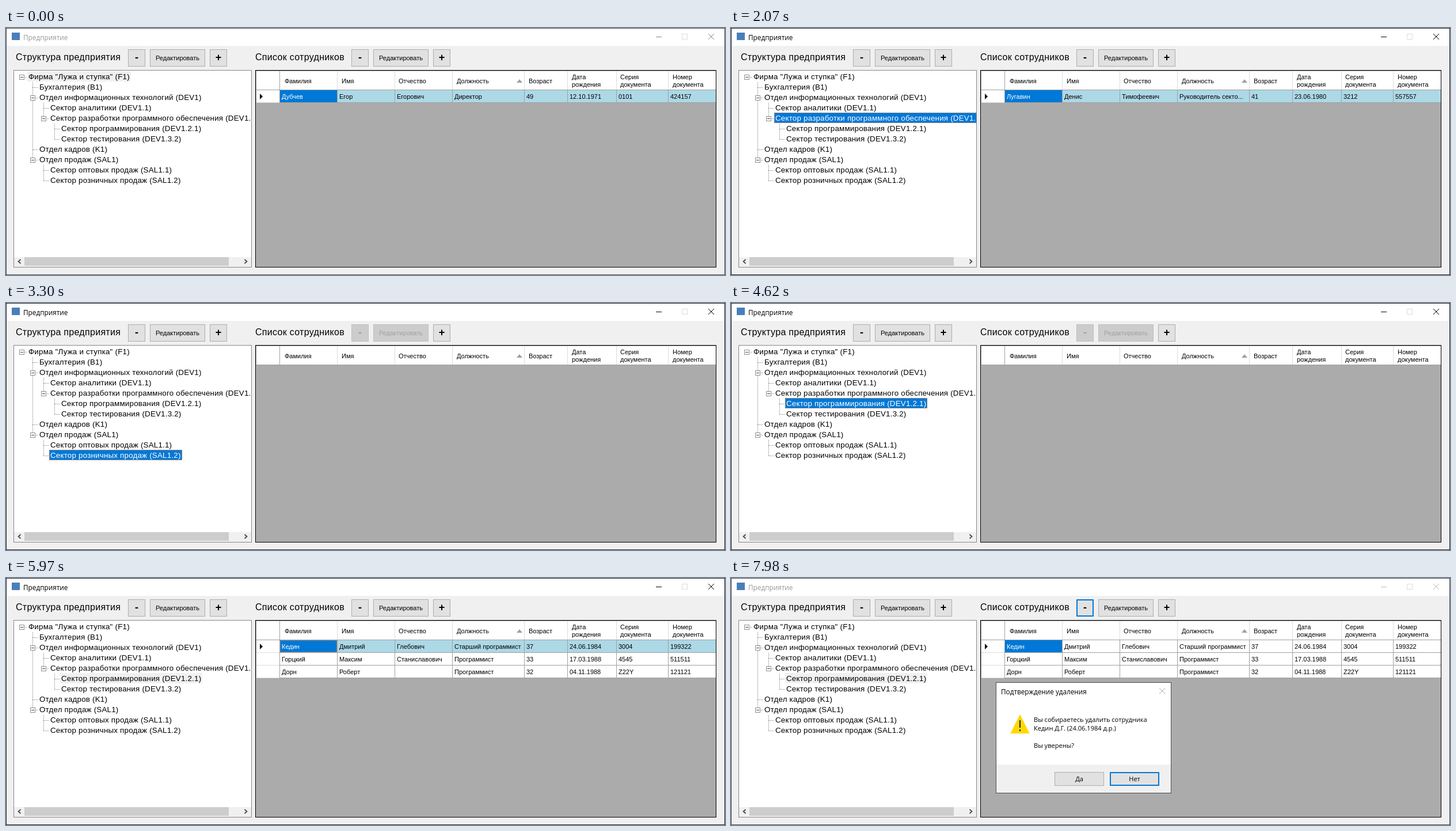
Recreate the animation shown at these times as an HTML page. Size 1249x429 px, loop 8000 ms.

```html
<!DOCTYPE html>
<html lang="ru">
<head>
<meta charset="utf-8">
<title>Предприятие</title>
<style>
html, body { margin: 0; width: 100%; height: 100%; overflow: hidden; background: #f0f0f0; }
svg { display: block; }
rect, line { shape-rendering: crispEdges; }
text { font: 11px "Liberation Sans", Arial, sans-serif; white-space: pre; }
.label { font-size: 16px; letter-spacing: .3px; }
.tree { font-size: 13.33px; letter-spacing: .22px; }
.sign { font-size: 18px; font-weight: bold; text-anchor: middle; }
.mid { text-anchor: middle; }
.title { font: 11.8px "Open Sans", "Noto Sans", sans-serif; }
.msg { font: 11.1px "Open Sans", "Noto Sans", sans-serif; }
</style>
</head>
<body>
<svg id="stage" width="1249" height="429"></svg>
<script>
const LOOP = 8000, BLUE = "#0078d7", GRAY = "#a0a0a0", PALE = "#dcdcdc";
const stage = document.getElementById("stage");

// depth, text, has children
const nodes = [
  [0, 'Фирма "Лужа и ступка" (F1)', 1],
  [1, "Бухгалтерия (B1)"],
  [1, "Отдел информационных технологий (DEV1)", 1],
  [2, "Сектор аналитики (DEV1.1)"],
  [2, "Сектор разработки программного обеспечения (DEV1.2)", 1],
  [3, "Сектор программирования (DEV1.2.1)"],
  [3, "Сектор тестирования (DEV1.3.2)"],
  [1, "Отдел кадров (K1)"],
  [1, "Отдел продаж (SAL1)", 1],
  [2, "Сектор оптовых продаж (SAL1.1)"],
  [2, "Сектор розничных продаж (SAL1.2)"]
];

// employees of each node
const staff = [
  ["Дубчев|Егор|Егорович|Директор|49|12.10.1971|0101|424157"],
  ["Ветлина|Нина|Макаровна|Главный бухгалтер|45|14.02.1976|2210|318204"],
  ["Саженов|Кирилл|Юрьевич|Начальник отдела|44|05.09.1977|1507|640312"],
  ["Полынин|Артём|Денисович|Старший аналитик|38|19.04.1983|4102|275130",
   "Маковцев|Роман|Ильич|Аналитик|31|08.11.1990|3315|509418",
   "Стежкина|Алла|Юрьевна|Аналитик|29|27.01.1992|4008|731226"],
  ["Лугавин|Денис|Тимофеевич|Руководитель секто...|41|23.06.1980|3212|557557"],
  ["Кедин|Дмитрий|Глебович|Старший программист|37|24.06.1984|3004|199322",
   "Горцкий|Максим|Станиславович|Программист|33|17.03.1988|4545|511511",
   "Дорн|Роберт||Программист|32|04.11.1988|Z22Y|121121"],
  ["Ручьин|Антон|Макарович|Тестировщик|30|11.05.1991|3811|402517",
   "Липцева|Дарья|Ильинична|Тестировщик|27|02.12.1993|4217|610933"],
  ["Рябцева|Ольга|Юрьевна|Начальник отдела|46|30.08.1975|1904|223871"],
  ["Камушев|Игорь|Денисович|Начальник отдела|43|16.07.1978|2706|348150"],
  ["Травкин|Семён|Макарович|Менеджер|35|21.10.1985|3109|487062"],
  []
];

const cols = [475, 575, 675, 775, 900, 975, 1060, 1150, 1233];
const heads = [[484, "Фамилия"], [583, "Имя"], [682, "Отчество"], [783, "Должность"], [908, "Возраст"],
  [983, "Дата", "рождения"], [1067, "Серия", "документа"], [1158, "Номер", "документа"]];

// timelines: [start ms, value]
const pick = [[0, 0], [1470, 1], [1670, 2], [1870, 3], [2070, 4], [2270, 5], [2400, 6], [2600, 7],
  [2800, 8], [2930, 9], [3300, 10], [4620, 5]];
const list = [...pick.slice(0, -1), [4750, 5]];
const current = [[0, 0], [5550, 1], [5970, 0], [6570, 1], [7100, 0]];
const focus = [[0, "none"], [1010, "tree"], [5480, "grid"], [7660, "button"]];
const hover = [[0, ""], [270, "add"], [340, ""], [410, "edit"], [480, ""], [4950, "header"], [5020, ""],
  [7500, "remove"], [7580, "press"], [7660, ""]];
const fade = [[0, 0], [7740, .35], [7820, .7], [7900, .9], [7980, 1]];
const at = (steps, t) => steps.findLast(s => s[0] <= t)[1];

const rect = (x, y, w, h, fill, extra = "") =>
  `<rect x="${x}" y="${y}" width="${w}" height="${h}" fill="${fill}" ${extra}/>`;
const frame = (x, y, w, h, fill, edge, width = 1, extra = "") =>
  rect(x + width / 2, y + width / 2, w - width, h - width, fill, `stroke="${edge}" stroke-width="${width}" ${extra}`);
const dots = (x, y, w, h) => frame(x, y, w, h, "none", "#ff8728", 1, 'stroke-dasharray="1 1"');
const path = (d, stroke, fill = "none", width = 1) =>
  `<path d="${d}" stroke="${stroke}" fill="${fill}" stroke-width="${width}"/>`;
const dotted = (x1, y1, x2, y2) =>
  `<line x1="${x1}" y1="${y1}" x2="${x2}" y2="${y2}" stroke="#808080" stroke-dasharray="1 1"/>`;
const text = (x, y, s, cls = "", fill = "#000") => `<text x="${x}" y="${y}" class="${cls}" fill="${fill}">${s}</text>`;
const cross = (x, y, color) => path(`M${x} ${y}l10 10m0 -10l-10 10`, color);

const pen = document.createElement("canvas").getContext("2d");
pen.font = '13.33px "Liberation Sans", Arial, sans-serif';
const treeWidth = s => pen.measureText(s).width + s.length * .22;

const looks = {
  normal: ["#e1e1e1", "#adadad"], hover: ["#e5f1fb", BLUE], press: ["#cce4f7", "#005499"],
  off: ["#ccc", "#bfbfbf"], focus: ["#e1e1e1", BLUE, 2]
};
function button(x, caption, look = "normal") {
  const sign = caption.length < 2, w = sign ? 30 : 96;
  return frame(x, 37, w, 30, ...looks[look]) +
    text(x + w / 2, sign ? 57 : 56, caption, sign ? "sign" : "mid", look == "off" ? GRAY : "#000");
}

function drawWindow(s) {
  const active = s.focus == "tree" || s.focus == "grid", modal = s.focus == "button";
  const ink = active ? "#000" : modal && s.fade ? "#bbb" : "#888";
  const off = !staff[s.list].length && "off";
  const look = name => s.hover == name ? "hover" : "normal";
  const remove = off || (modal ? "focus" : s.hover == "press" ? "press" : look("remove"));
  return rect(0, 0, 1249, 429, active ? "#23262d" : "#464b54") +
    rect(1, 1, 1247, 427, "#f0f0f0") + rect(1, 1, 1247, 30, "#fff") +
    rect(10, 8, 14, 13, "#4a7ebb") +
    text(30, 21, "Предприятие", "title", active ? "#000" : "#999") +
    rect(1129, 15, 10, 1, ink) + frame(1174, 10, 10, 10, "none", PALE) + cross(1220, 10, ink) +
    text(17, 56, "Структура предприятия", "label") + text(433, 56, "Список сотрудников", "label") +
    button(212, "-") + button(250, "Редактировать", look("edit")) + button(354, "+", look("add")) +
    button(600, "-", remove) + button(638, "Редактировать", off || "normal") + button(742, "+");
}

function drawTree(s) {
  let out = frame(13, 73, 414, 343, "#fff", "#828790") +
    '<svg x="14" y="74" width="412" height="341" viewBox="14 74 412 341">';
  for (const [x, y1, y2] of [[46.5, 94, 229], [65.5, 130, 157], [84.5, 166, 193], [65.5, 238, 265]])
    out += dotted(x, y1, x, y2);
  nodes.forEach(([depth, label, open], i) => {
    const x = 27 + 19 * depth, y = 85 + 18 * i, chosen = i == s.pick, live = chosen && s.focus == "tree";
    out += dotted(x, y + .5, x + 9, y + .5);
    if (open) out += frame(x - 4, y - 4, 9, 9, "#fff", "#919191") + rect(x - 2, y, 5, 1, "#444");
    if (chosen) {
      const box = [x + 10, y - 10, Math.round(treeWidth(label)) + 4, 18];
      out += rect(...box, live ? BLUE : "#f0f0f0") + (live ? dots(...box) : "");
    }
    out += text(x + 12, y + 4, label, "tree", live ? "#fff" : "#000");
  });
  return out + rect(14, 398, 412, 17, "#f0f0f0") + rect(32, 398, 355, 15, "#cdcdcd") +
    path("M25.5 402l-4 3.5l4 3.5M414.5 402l4 3.5l-4 3.5", "#444", "none", 1.7) + "</svg>";
}

function drawGrid(s) {
  const people = staff[s.list];
  let out = frame(433, 73, 801, 343, "#ababab", "#000") + rect(434, 74, 799, 34, GRAY) +
    rect(435, 75, 798, 32, "#fff");
  cols.slice(0, -1).forEach((x, i) => out += rect(x, 75, 1, 32, i ? PALE : GRAY));
  for (const [x, a, b] of heads) out += b ? text(x, 89, a) + text(x, 102, b) : text(x, 96, a);
  out += path("M887 95h10l-5 -6z", "none", GRAY);
  people.forEach((person, i) => {
    const y = 108 + 22 * i, here = i == s.current;
    out += rect(434, y, 799, 22, GRAY) + rect(435, y, 40, 22, PALE) +
      rect(435, y, 40, 21, s.hover == "header" && i == 2 ? "#d9ebf9" : "#fff") +
      rect(476, y, 757, 21, here && s.focus != "button" ? "#add8e6" : "#fff");
    if (here) {
      out += rect(476, y, 99, 21, BLUE) + path(`M441 ${y + 6}v10l5 -5z`, "none", "#000");
      if (s.focus == "grid") out += dots(476, y, 99, 21);
    }
    person.split("|").forEach((value, c) => {
      out += rect(cols[c], y, 1, 21, GRAY) + text(cols[c] + 4, y + 15, value, "", here && !c ? "#fff" : "#000");
    });
  });
  return out;
}

function drawDialog(s) {
  if (!s.fade) return "";
  return `<g opacity="${s.fade}">` + frame(460, 181, 305, 193, "#fff", "#4d4d4d") +
    rect(461, 324, 303, 49, "#f0f0f0") + text(469, 202, "Подтверждение удаления", "title") +
    cross(744, 191, "#aaa") +
    path("M502 239L517 269H487Z", "#ffd800", "#ffd800", 2) +
    rect(501, 247, 2, 13, "#222") + rect(501, 263, 2, 3, "#222") +
    text(526, 250, "Вы собираетесь удалить сотрудника", "msg") +
    text(526, 265, "Кедин Д.Г. (24.06.1984 д.р.)", "msg") +
    text(526, 295, "Вы уверены?", "msg") +
    frame(562, 337, 86, 24, "#e1e1e1", "#adadad") + text(605, 353, "Да", "msg mid") +
    frame(658, 337, 86, 24, "#e1e1e1", BLUE, 2) + text(701, 353, "Нет", "msg mid") + "</g>";
}

const tracks = { pick, list, current, focus, hover, fade };
let shown = "";
function tick(now) {
  const s = {};
  for (const name in tracks) s[name] = at(tracks[name], now % LOOP);
  const key = JSON.stringify(s);
  if (key != shown) {
    shown = key;
    stage.innerHTML = drawWindow(s) + drawTree(s) + drawGrid(s) + drawDialog(s);
  }
  requestAnimationFrame(tick);
}
tick(0);
</script>
</body>
</html>
```
